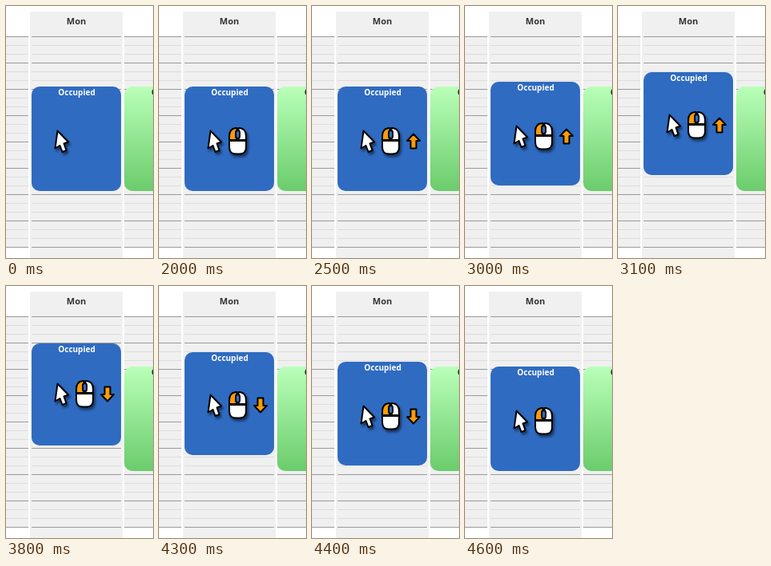
An HTML page that plays this animation: 184 by 316 pixels, repeating every 5100 ms.

```html
<!DOCTYPE html>
<html lang="en">
<head>
<meta charset="utf-8">
<title>Drag an event</title>
<style>
  html, body { margin: 0; width: 100%; height: 100%; overflow: hidden; background: #fff; }
  svg { display: block; }
  text { font: bold 10px "Open Sans", "Noto Sans", sans-serif; }
  .day { font-size: 11px; fill: #333; text-anchor: middle; }
  .outlined { stroke: #000; stroke-width: 2; stroke-linejoin: round; }
  .shadow { filter: drop-shadow(2px 3px 1.5px rgba(0, 0, 0, .5)); }
</style>
</head>
<body>
<svg width="184" height="316" viewBox="0 0 184 316">
  <defs>
    <linearGradient id="green" x2="0" y2="1">
      <stop stop-color="#b9ffb9"/>
      <stop offset="1" stop-color="#6bcc6b"/>
    </linearGradient>
    <pattern id="hours" y="38" width="8" height="33" patternUnits="userSpaceOnUse">
      <path d="M0 .5H8" stroke="#999"/>
      <path d="M0 11.5H8M0 22.5H8" stroke="#ddd"/>
    </pattern>
  </defs>

  <path d="M0 38H28V303H0ZM30 7H146V316H30ZM148 38H184V303H148Z" fill="#f0f0f0"/>
  <path d="M0 38H28V303H0ZM32 38H144V303H32ZM148 38H184V303H148Z" fill="url(#hours)"/>
  <text class="day" x="88" y="23">Mon</text>

  <rect x="148" y="101" width="112" height="131" rx="10" fill="url(#green)"/>
  <text x="182" y="112" fill="#222">Occupied</text>

  <rect id="block" x="32" width="112" rx="10" fill="#2f6bc1"/>
  <text id="label" x="88.5" fill="#fff" text-anchor="middle">Occupied</text>

  <g id="tools">
    <path class="outlined shadow" fill="#fff"
      d="M64.5 156.5L78 170.5L72.5 172.5L75.5 181L70.5 183L67.5 175L61.5 178.5Z"/>
    <g id="mouse" class="shadow">
      <g class="outlined">
        <path fill="#ff9a0a" d="M97.5 153H96Q88 154 88 163V168H97.5Z"/>
        <path fill="#fff" d="M99.5 153H101Q109 154 109 163V168H99.5Z"/>
        <path fill="#fff" d="M88 169H109V177Q109 185.5 101 185.5H96Q88 185.5 88 177Z"/>
        <rect x="96" y="156" width="5" height="10" rx="2.5" fill="#2f6bc1"/>
      </g>
    </g>
    <path id="arrow" class="outlined" fill="#ff9a0a"
      d="M127 160.5L135 169H130.5V178.5H123.5V169H119Z"/>
  </g>
</svg>
<script>
  const LOOP = 5100;
  const [block, label, tools, mouse, arrow] =
    ["block", "label", "tools", "mouse", "arrow"].map(id => document.getElementById(id));

  // The block snaps to the time grid while the pointer moves freely.
  const poses = [
    { top: 101, bottom: 232, lift: 0 },
    { top: 95, bottom: 225, lift: 6 },
    { top: 83, bottom: 212, lift: 20 },
    { top: 72, bottom: 200, lift: 34 },
  ];

  const clamp = n => Math.max(0, Math.min(3, n));
  const stepsSince = (t, start) => clamp(Math.floor((t - start) / 100) + 1);
  const show = (element, visible) =>
    element.setAttribute("visibility", visible ? "visible" : "hidden");

  function draw(now) {
    const t = now % LOOP;
    const { top, bottom, lift } = poses[stepsSince(t, 3000) - stepsSince(t, 4300)];
    block.setAttribute("y", top);
    block.setAttribute("height", bottom - top);
    label.setAttribute("y", top + 11);
    tools.setAttribute("transform", `translate(0 ${-lift})`);

    const down = t >= 3800;
    show(mouse, t >= 2000);
    show(arrow, (t >= 2500 && t < 3300) || (down && t < 4600));
    arrow.setAttribute("transform", down ? "translate(0 339) scale(1 -1)" : "");
    requestAnimationFrame(tick);
  }

  const start = performance.now();
  function tick() { draw(performance.now() - start); }
  tick();
</script>
</body>
</html>
```
